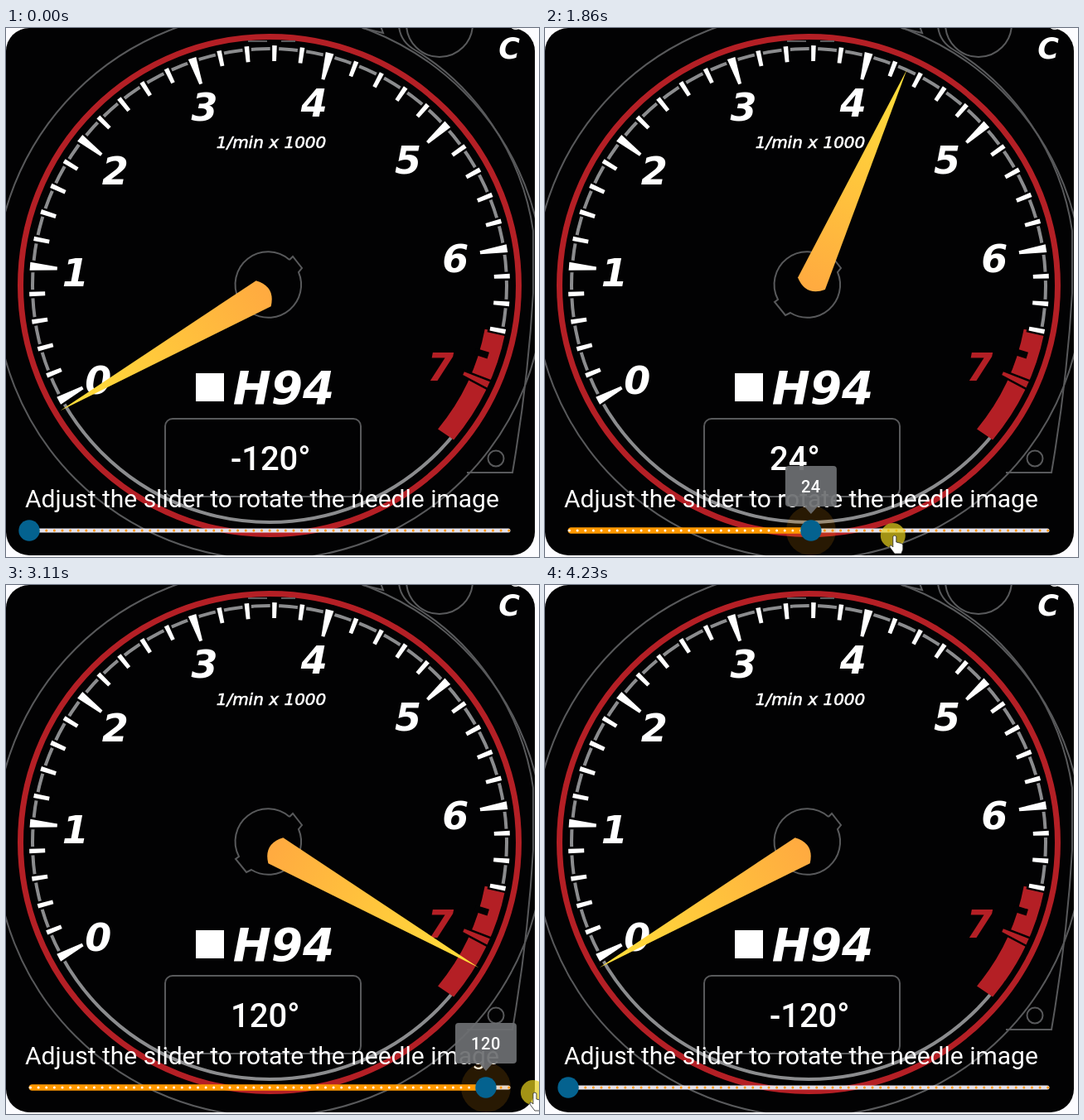
Recreate the animation shown at these times as an HTML page. Size 643 px wide and 639 px high, loop 4740 ms.

```html
<!DOCTYPE html>
<html lang="en">
<head>
<meta charset="utf-8">
<title>Rev counter slider</title>
<style>
  html, body { margin: 0; width: 100%; height: 100%; overflow: hidden; background: #fcfcff; }
  svg { display: block; width: 643px; height: 639px; }
  text { fill: #fff; font-family: Roboto, sans-serif; }
  .dial { font: italic bold 46px "DejaVu Sans", sans-serif; text-anchor: middle; }
  .unit { font: italic 20px "DejaVu Sans", sans-serif; text-anchor: middle; stroke: #fff; stroke-width: .6px; }
  .line { fill: none; stroke: #58595b; stroke-width: 2; }
  .round { fill: none; stroke-linecap: round; }
</style>
</head>
<body>
<svg viewBox="0 0 643 639">
  <defs>
    <clipPath id="card"><rect width="638" height="637" rx="28"/></clipPath>
    <linearGradient id="gold" gradientUnits="userSpaceOnUse" x1="0" y1="25" x2="0" y2="310">
      <stop stop-color="#ffe03a"/>
      <stop offset=".5" stop-color="#ffc63c"/>
      <stop offset="1" stop-color="#ffab40"/>
    </linearGradient>
  </defs>
  <g clip-path="url(#card)">
    <rect width="638" height="637" fill="#020203"/>

    <g class="line">
      <circle cx="318" cy="311" r="331"/>
      <circle cx="523" cy="-5" r="40"/>
      <path d="M430 0L455 6L452 -2M474 -2Q476 17 494 27C565 70 622 150 636 245V320Q630 425 611 537H556"/>
      <circle cx="591" cy="520" r="9.5"/>
      <rect x="192" y="472" width="236" height="94" rx="9"/>
      <path d="M342 280L346 276L357 290L353 295A39.5 39.5 0 0 1 296 344L290 347L277 331L281 328A39.5 39.5 0 0 1 342 280"/>
    </g>

    <circle cx="318" cy="311" r="300.5" fill="none" stroke="#b41f25" stroke-width="7"/>
    <path class="line" d="M292 16H315M332 16H349"/>
    <circle cx="318" cy="311" r="286" fill="none" stroke="#8b8c8e" stroke-width="4"/>
    <g id="scale"></g>

    <text class="dial" x="607" y="37" style="font-size:35px">C</text>
    <ellipse cx="615" cy="-2" rx="6" ry="4" fill="#fff"/>
    <text class="unit" x="320" y="145">1/min x 1000</text>
    <rect x="229" y="417" width="34" height="34" fill="#fff"/>
    <text class="dial" x="335" y="454" style="font-size:55px">H94</text>

    <path id="needle" d="M318 25L336 308Q318 325 300 308Z" fill="url(#gold)"/>

    <text id="degrees" x="271" y="534" font-size="40" font-weight="500"></text>
    <text x="23" y="579" font-size="30">Adjust the slider to rotate the needle image</text>

    <g class="round">
      <path d="M30 607H606" stroke="#e4e1ec" stroke-width="5"/>
      <path d="M29.5 607H607" stroke="#ff9800" stroke-width="3" stroke-dasharray="0 9.62"/>
      <path id="filled" stroke="#ff9800" stroke-width="7.5"/>
      <path id="ticks" stroke="#fff" stroke-width="3" stroke-dasharray="0 9.62"/>
    </g>
    <g id="thumb">
      <circle id="halo" r="30" fill="#ff9800"/>
      <circle r="12.7" fill="#04628f"/>
      <g id="bubble">
        <g fill="#6d6f72" opacity=".93">
          <rect id="bubbleBox" y="-78" height="49" rx="4"/>
          <path d="M-8 -29H8L0 -20Z"/>
        </g>
        <text id="bubbleText" y="-46" font-size="20" font-weight="500" letter-spacing=".6" text-anchor="middle"></text>
      </g>
    </g>
  </g>

  <g id="cursor">
    <circle r="15" fill="#e8d21e" opacity=".7"/>
    <path d="M0 1Q2-1 4 1V8L10 9.500L12 11V17L10 22H2L-4 14Q-4 11-2 12L0 14Z" fill="#fff" stroke="#222" stroke-width=".8"/>
  </g>
</svg>
<script>
const LOOP = 4740;
const RED = "#b41f25", BLACK = "#020203", WHITE = "#fff";
const ZERO = -118.7, UNIT = 33.3;   // dial angle of 0 and step per thousand

const $ = id => document.getElementById(id);
const clamp = (v, low, high) => Math.min(high, Math.max(low, v));
const polar = (deg, r) => {
  const a = deg * Math.PI / 180;
  return [318 + r * Math.sin(a), 311 - r * Math.cos(a)];
};

// Tapered tick, wider at the rim.
function wedge(deg, inner, outer, wIn, wOut, fill) {
  const side = (r, w) => polar(deg + w / r * 57.3, r);
  const points = [side(inner, -wIn), side(outer, -wOut), side(outer, wOut), side(inner, wIn)];
  return `<polygon points="${points.join(" ")}" fill="${fill}" stroke="${BLACK}" stroke-width="5" paint-order="stroke"/>`;
}

function drawScale() {
  let out = `<path d="M${polar(101.5, 265)}A265 265 0 0 1 ${polar(130.5, 267)}L${polar(130, 290)}A290 290 0 0 0 ${polar(101.5, 290)}Z" fill="${RED}"/>`;
  out += `<path d="M${polar(107.8, 260)}L${polar(107.8, 277)}" stroke="${BLACK}" stroke-width="8"/>`;
  for (let i = 0; i < 34; i++) {
    const deg = ZERO + i * UNIT / 5;
    out += i % 5 ? wedge(deg, 271, 290, 2.4, 2.8, WHITE) : wedge(deg, 257, 290, 2, 5, WHITE);
  }
  out += wedge(ZERO + 7 * UNIT, 257, 290, 2, 4, RED);
  for (let n = 0; n < 8; n++) {
    const [x, y] = polar(ZERO + n * UNIT, 231);
    out += `<text class="dial" x="${x - 4}" y="${y + 20}" style="fill:${n < 7 ? WHITE : RED}">${n}</text>`;
  }
  $("scale").innerHTML = out;
}

// Monotone cubic through [time, value] points: flat at every turning point.
function curve(points) {
  const last = points.length - 1;
  const slope = i => (points[i + 1][1] - points[i][1]) / (points[i + 1][0] - points[i][0]);
  const tangent = i => {
    if (i === 0 || i === last) return 0;
    const a = slope(i - 1), b = slope(i);
    return a * b > 0 ? 2 * a * b / (a + b) : 0;
  };
  return t => {
    t = clamp(t, points[0][0], points[last][0]);
    const i = Math.max(0, points.findIndex(p => p[0] >= t) - 1);
    const [t0, v0] = points[i], [t1, v1] = points[i + 1];
    const h = t1 - t0, s = (t - t0) / h, q = 1 - s;
    return v0 * (1 + 2 * s) * q * q + v1 * s * s * (3 - 2 * s)
      + h * s * q * (tangent(i) * q - tangent(i + 1) * s);
  };
}

// The dragged angle; the cursor runs ahead of it and the thumb trails behind.
const drag = curve([[770, -120], [1300, -88], [1860, 24], [2080, 90], [2320, 0],
  [2500, -74], [2800, 28], [3150, 132], [3470, 40], [4050, -122]]);
const CURSOR_LEAD = 55, THUMB_LAG = 95;
const limited = t => clamp(drag(t), -120, 120);
const toX = deg => 28 + (deg + 120) / 240 * 580;

const ease = (t, from, to) => {
  const s = clamp((t - from) / (to - from), 0, 1);
  return s * s * (3 - 2 * s);
};

function setAttributes(id, attributes) {
  for (const name in attributes) $(id).setAttribute(name, attributes[name]);
}

function drawSlider(t, value) {
  const x = toX(limited(t - THUMB_LAG));
  const pressed = ease(t, 750, 850) - ease(t, 4070, 4180);
  const hovered = ease(t, 380, 480) - ease(t, 4080, 4220);
  const label = String(value);
  const width = Math.max(60, label.replace("-", "").length * 12 + (value < 0 ? 7 : 0) + 38);

  $("filled").style.visibility = $("ticks").style.visibility = x > 32 ? "visible" : "hidden";
  setAttributes("filled", { d: `M31.500 607H${x}` });
  setAttributes("ticks", { d: `M29.500 607H${x}` });
  setAttributes("thumb", { transform: `translate(${x} 607)` });
  setAttributes("halo", { opacity: 0.07 * hovered + 0.08 * pressed });
  setAttributes("bubble", {
    transform: `translate(0 -20) scale(${pressed}) translate(0 20)`,
    visibility: pressed > 0.01 ? "visible" : "hidden"
  });
  setAttributes("bubbleBox", { x: -width / 2, width });
  $("bubbleText").textContent = label;
}

function drawCursor(t) {
  const away = 1 - ease(t, 140, 550) + ease(t, 4040, 4230);
  const x = toX(drag(t + CURSOR_LEAD)) + 34 * away;
  setAttributes("cursor", {
    transform: `translate(${x} ${613 + 45 * away})`,
    visibility: away < 1 ? "visible" : "hidden"
  });
}

function render(t) {
  const value = Math.round(limited(t) / 4) * 4 || 0;
  setAttributes("needle", { transform: `rotate(${value} 318 316.5)` });
  $("degrees").textContent = value + "°";
  drawSlider(t, value);
  drawCursor(t);
}

drawScale();
const begin = performance.now();
function tick() {
  render((performance.now() - begin) % LOOP);
  requestAnimationFrame(tick);
}
render(0);
requestAnimationFrame(tick);
</script>
</body>
</html>
```
